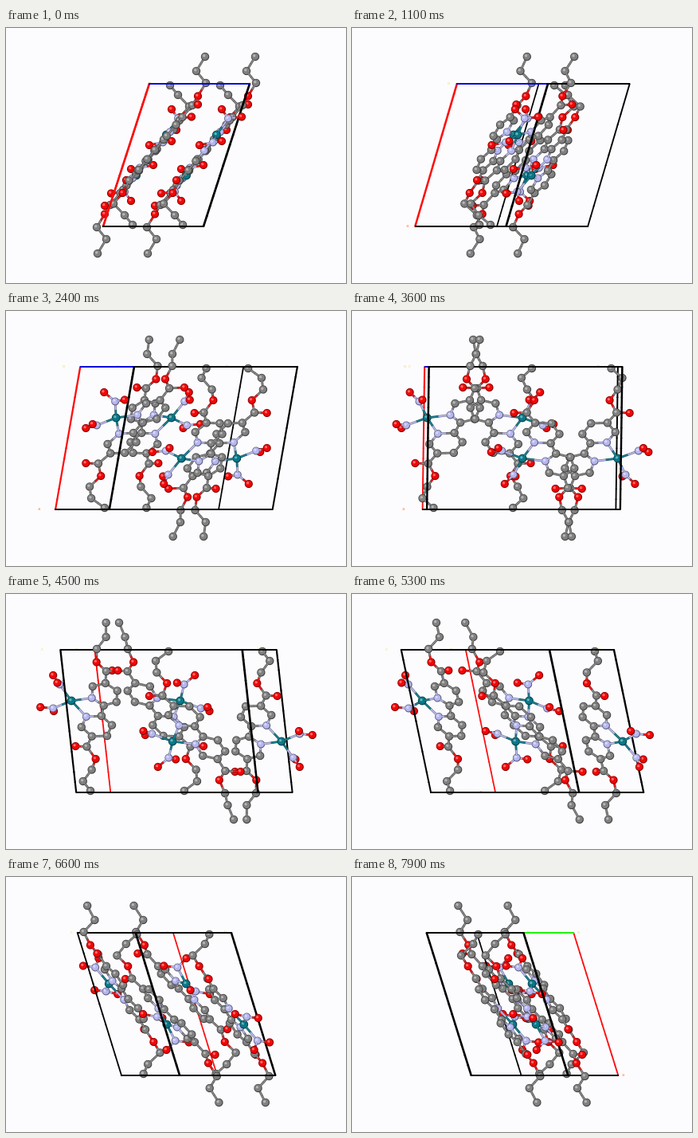
A matplotlib script that plays this animation: 427 px wide and 320 px high, repeating every 8000 ms.

```python
import numpy as np
import matplotlib.pyplot as plt
from matplotlib.animation import FuncAnimation
from matplotlib.collections import PolyCollection
from matplotlib.colors import to_rgb

W, H, DPI = 427, 320, 100
FRAMES, INTERVAL, STEP = 80, 100, 2.5
CX, SUM_Y = 214, 319            # rotation axis, and y + y' of inverted pairs

# Unit cell: horizontal x, screen y, depth z before turning
ORIGIN = np.array([-34.0, 70, -121.5])
A = np.array([-58.0, 179, 0])
B = np.array([0, 0, 243.0])
C = np.array([126.0, 0, 0])

# One molecule: metal, two NO2 groups, a bipyridine with two propyl esters
MOLECULE = {
    "M": [(50.4, 134, -122)],
    "N": [(55, 130.5, -93), (35, 154, -107.7), (65, 113.5, -132.5),
          (46, 143.5, -148)],
    "O": [(57, 102, -144), (82, 111.5, -129.3), (57, 142, -161),
          (29, 147, -153.3), (0, 191, -134.8), (-4.5, 207, -109.5),
          (90, 96, -45.5), (90, 85.5, -74)],
    "C": [(36, 153, -87), (26.4, 164.6, -76.6), (15.8, 178, -86.9),
          (14.8, 178.6, -107.6), (24.4, 167, -118),
          (47, 140, -80), (50.8, 135.5, -61.6), (62.6, 121.5, -56.2),
          (70.5, 111.9, -69.2), (66.8, 116, -87.6),
          (3.5, 191.5, -118.5), (-16, 220.5, -119), (-2, 235, -125.5),
          (8, 247, -112),
          (83, 97, -63.5), (100, 69, -70), (88, 54, -62), (99, 36, -58)],
}
COLORS = {"M": "#087c8c", "N": "#bcbcf6", "O": "#fb0606", "C": "#848484"}
RADII = {"M": 5.4, "N": 5.0, "O": 5.1, "C": 5.2}

kinds = [k for k, pts in MOLECULE.items() for _ in pts]
unit = np.array([p for pts in MOLECULE.values() for p in pts], float)


def shade(color, f):
    """Darken for f < 1, blend toward white for f > 1."""
    rgb = np.array(to_rgb(color))
    return tuple(rgb * f if f <= 1 else rgb + (1 - rgb) * (f - 1))


def bonded(i, j):
    d = np.linalg.norm(unit[i] - unit[j])
    if kinds[i] == "M":
        return kinds[j] == "N" and d < 33
    return d < 24


bonds = [(i, j) for i in range(len(unit)) for j in range(i + 1, len(unit))
         if bonded(i, j)]


def copies(p):
    """Four symmetry mates: identity, glide plane, and their inversions."""
    glide = p * [1, 1, -1] + [-C[0] / 2, 0, -B[2] / 2]
    flip = np.array([0, SUM_Y, 0])
    return [p, glide, flip - p, flip - glide]


# Scene: spheres (centre, kind) and sticks (start, end, colour)
spheres, sticks = [], []
for mol in copies(unit):
    spheres += list(zip(mol, kinds))
    for i, j in bonds:
        mid = (mol[i] + mol[j]) / 2
        for k in (i, j):
            along = (mid - mol[k]) / np.linalg.norm(mid - mol[k])
            start = mol[k] + along * (RADII[kinds[k]] - 0.7)
            sticks.append((start, mid, COLORS[kinds[k]]))

edges = []
PIECES = 14
for axis, tint, u, v in ((A, "#ff0c0c", B, C), (B, "#22f400", A, C),
                         (C, "#0404e0", A, B)):
    for m in (0, 1):
        for n in (0, 1):
            start = ORIGIN + m * u + n * v
            color = to_rgb("black" if m or n else tint)
            for s in range(PIECES):
                edges.append((start + axis * s / PIECES,
                              start + axis * (s + 1) / PIECES, color))

sphere_pos = np.array([p for p, _ in spheres])
stick_pos = np.array([(p, q) for p, q, _ in sticks])
edge_pos = np.array([(p, q) for p, q, _ in edges])
sphere_look = {k: (shade(c, 0.5), shade(c, 0.97), shade(c, 1.42))
               for k, c in COLORS.items()}
stick_look = {c: (shade(c, 0.6), shade(c, 1.1)) for c in COLORS.values()}

turn = np.linspace(0, 2 * np.pi, 20, endpoint=False)
CIRCLE = np.column_stack([np.cos(turn), np.sin(turn)])


def project(p, theta):
    """Turn about the vertical axis; return screen points and nearness."""
    c, s = np.cos(theta), np.sin(theta)
    x, y, z = p[..., 0], p[..., 1], p[..., 2]
    return np.stack([CX + x * c + z * s, y], -1), x * s - z * c


def quad(p, q, width, extend=0.3):
    d = q - p
    d = d / (np.hypot(*d) + 1e-6)
    n = np.array([-d[1], d[0]]) * width / 2
    p, q = p - d * extend, q + d * extend
    return np.array([p + n, q + n, q - n, p - n])


# The small margin keeps the pixel size from rounding down
fig = plt.figure(figsize=((W + 0.01) / DPI, (H + 0.01) / DPI), dpi=DPI,
                 facecolor="#fcfcfe")
ax = fig.add_axes([0, 0, 1, 1])
ax.set_xlim(0, W)
ax.set_ylim(H, 0)
ax.axis("off")
scene = PolyCollection([], linewidths=0, edgecolors="none")
ax.add_collection(scene, autolim=False)

label_spots = [(ORIGIN, "o", "#f2dc7a"), (ORIGIN + A, "a", "#ff8a48"),
               (ORIGIN + B, "b", "#f2dc7a"), (ORIGIN + C, "c", "#f2dc7a")]
labels = [ax.text(0, 0, t, color=c, fontsize=4, ha="center", va="center",
                  family="DejaVu Sans", zorder=0.5)
          for _, t, c in label_spots]
label_pos = np.array([p - 0.1 * B - [0, 1, 0] for p, _, _ in label_spots])


def draw(frame):
    theta = np.radians(STEP * max(frame - 1, 0))
    items = []

    pts, near = project(edge_pos, theta)
    for (p, q), d, (_, _, color) in zip(pts, near.mean(1), edges):
        width = np.interp(d, [-130, 130], [1.7, 2.7])
        items.append((d, quad(p, q, width, 0.6), color))

    pts, near = project(stick_pos, theta)
    for (p, q), d, (_, _, color) in zip(pts, near.mean(1), sticks):
        dark, light = stick_look[color]
        items.append((d, quad(p, q, 2.8), dark))
        items.append((d, quad(p, q, 1.4), light))

    pts, near = project(sphere_pos, theta)
    for p, d, (_, kind) in zip(pts, near, spheres):
        r = RADII[kind]
        dark, base, light = sphere_look[kind]
        items.append((d, p + CIRCLE * r, dark))
        items.append((d, p - 0.2 + CIRCLE * (r - 0.9), base))
        items.append((d, p - 1.2 + CIRCLE * 1.6, light))

    items.sort(key=lambda it: it[0])
    scene.set_verts([it[1] for it in items])
    scene.set_facecolor([it[2] for it in items])

    pts, _ = project(label_pos, theta)
    for text, p in zip(labels, pts):
        text.set_position(p)
    return [scene, *labels]


anim = FuncAnimation(fig, draw, frames=FRAMES, interval=INTERVAL,
                     repeat=True, repeat_delay=0, blit=False)
plt.show()
```
